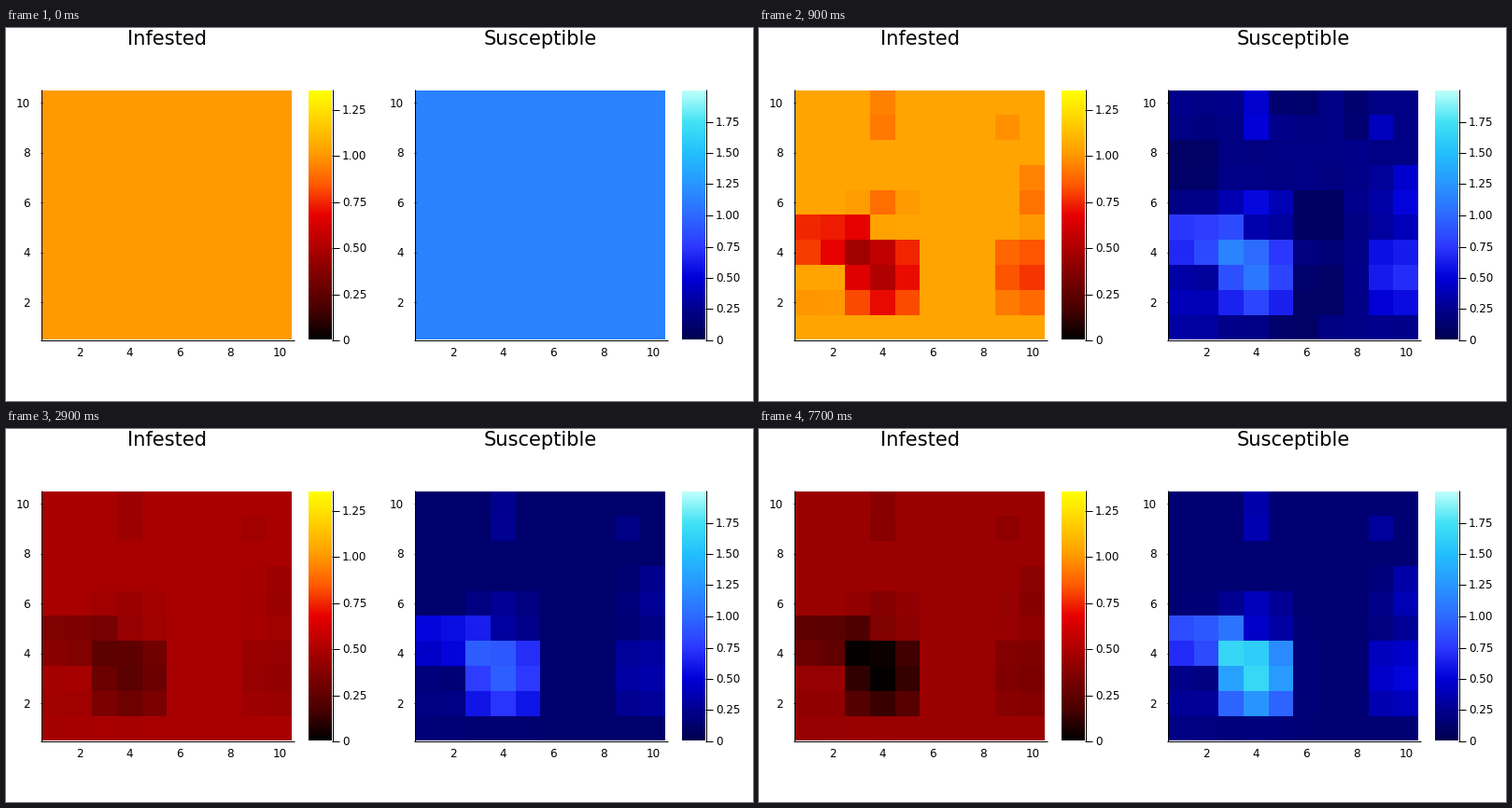
Recreate the animation shown at these times as a matplotlib script. Size 800 by 400 pixels, loop 8 s.

```python
import numpy as np
import matplotlib.pyplot as plt
from matplotlib.animation import FuncAnimation

W, H, DPI = 800, 400, 100
STEP, LOOP = 100, 8000
TOP, BOTTOM = 67, 334
I_MAX, S_MAX = 1.356, 2.0

X, Y = np.meshgrid(np.arange(1, 11), np.arange(10, 0, -1))


def plateau(x, y, rx, ry, height):
    """Flat-topped bump on the 10 x 10 grid."""
    return height * np.exp(-((X - x) / rx) ** 4 - ((Y - y) / ry) ** 4)


# Regions that start out more or less resistant: x, y, radii, height
REGIONS = [
    (4, 9.6, .7, 1, .33), (5.5, 10, .8, .7, -.22), (8, 9.3, .9, .9, -.18),
    (9, 9, .6, .6, .3), (1.5, 7.7, 1.2, 1.1, -.28), (4, 6, 1.2, .6, .35),
    (10, 6.2, 1, 1.4, .34), (2, 4.5, 1.6, .9, .52), (6.5, 5.4, .9, 1.3, -.3),
    (4, 3.1, 1.4, 1.5, .56), (9.7, 3, 1.2, 1.5, .47), (1.2, 2, 1.1, 1.3, .25),
    (6.5, 2.3, 1, 1, -.28), (5.5, 1, .8, .6, -.27),
]
noise = np.random.default_rng(4).uniform(-.04, .04, X.shape)
early = np.clip(.53 + noise + sum(plateau(*r) for r in REGIONS), .2, 1.15)
late = (.14 + .9 * np.clip(early - .6, 0, None)
        + plateau(4, 3.2, 1.4, 1.6, 1.1) + plateau(2, 4.7, 1.7, .85, .45))

# Time; susceptible = scale * early^p * late^q;
# infested = min(cap, start - slope * susceptible)
KEYS = [
    (0, 1.135, 0, 0, 1.01, 1.01, 0),
    (500, 1, 1, 0, 1.3, 1.45, .75),
    (900, .82, 1.35, .27, 1.04, 1.28, .72),
    (1300, .65, .95, .5, .84, 1.05, .62),
    (2900, .6, 0, .85, .48, .52, .31),
    (5200, .78, 0, .9, .46, .5, .33),
    (7700, 1, 0, 1, .44, .48, .28),
]


def densities(key):
    _, scale, p, q, cap, start, slope = key
    s = scale * early ** p * late ** q
    return np.clip(start - slope * s, 0, cap), s


def state(t):
    times = [key[0] for key in KEYS]
    t = min(t, times[-1])
    k = min(np.searchsorted(times, t, side="right"), len(KEYS) - 1) - 1
    w = (t - times[k]) / (times[k + 1] - times[k])
    if times[k] == 1300:  # decay towards the steady level
        w = (1 - np.exp(-2.3 * w)) / (1 - np.exp(-2.3))
    return [a + (b - a) * w
            for a, b in zip(densities(KEYS[k]), densities(KEYS[k + 1]))]


# Evenly spaced stops with evenly rising lightness
HEAT = [(0, 0, 0), (74, 0, 0), (123, 0, 0), (177, 0, 0), (230, 0, 0),
        (255, 91, 0), (255, 157, 0), (255, 207, 0), (255, 255, 0)]
COOL = [(0, 0, 78), (0, 0, 145), (0, 0, 217), (45, 57, 255), (45, 106, 255),
        (40, 150, 255), (34, 191, 252), (65, 226, 245), (190, 255, 250)]


def colorize(value, top_value, stops):
    at = np.linspace(0, top_value, len(stops))
    return np.stack([np.interp(value, at, c) for c in np.array(stops).T / 255], -1)


fig = plt.figure(figsize=(W / DPI, H / DPI), dpi=DPI, facecolor="white")
ax = fig.add_axes([0, 0, 1, 1])
ax.axis("off")


def text(x, y, label, size=12, ha="center"):
    # y is the middle of the digits or capitals
    ax.text(x, y + .365 * size, label, fontsize=size * 72 / DPI, ha=ha,
            va="baseline", family="DejaVu Sans", color="black")


def line(x0, y0, x1, y1):
    ax.plot([x0, x1], [y0, y1], color="black", lw=.72, solid_capstyle="butt")


def mesh(colors, x0, x1):
    rows, columns = colors.shape[:2]
    x_edges = np.round(np.linspace(x0, x1, columns + 1))
    y_edges = np.round(np.linspace(TOP - .4, BOTTOM + .4, rows + 1))
    return ax.pcolormesh(x_edges, y_edges, colors, zorder=1)


def panel(left, title, top_value, stops, ticks):
    heat = mesh(np.zeros((10, 10, 3)), left + 38.8, left + 306)
    bar = np.linspace(top_value, 0, BOTTOM - TOP)[:, None]
    mesh(colorize(bar, top_value, stops), left + 324, left + 349)
    text(left + 172.6, 10.6, title, 21)
    line(left + 37.5, TOP - 1, left + 37.5, BOTTOM + 1)
    line(left + 37, BOTTOM + .5, left + 309, BOTTOM + .5)
    for n in range(2, 11, 2):
        offset = (n - .5) * 26.75
        text(left + 38.9 + offset, 348, n)
        y = BOTTOM + .5 - offset
        text(left + 26, y, n, ha="right")
        line(left + 37, y, left + 39, y)
    line(left + 349.5, TOP - 1, left + 349.5, BOTTOM + 1)
    for tick in ticks:
        y = round(BOTTOM - tick / top_value * 268) + .5
        line(left + 349, y, left + 357, y)
        text(left + 360, y, f"{tick:.2f}" if tick else "0", ha="left")
    return heat


heats = (panel(0, "Infested", I_MAX, HEAT, np.arange(0, 1.3, .25)),
         panel(400, "Susceptible", S_MAX, COOL, np.arange(0, 1.8, .25)))
ax.set_xlim(0, W)
ax.set_ylim(H, 0)


def update(frame):
    t = frame * STEP
    if t > 3000:  # the late, slow phase is refreshed less often
        t -= t % 200
    infested, susceptible = state(t)
    heats[0].set_array(colorize(infested, I_MAX, HEAT))
    heats[1].set_array(colorize(susceptible, S_MAX, COOL))
    return heats


anim = FuncAnimation(fig, update, frames=LOOP // STEP, interval=STEP,
                     repeat=True, repeat_delay=0, blit=False)
plt.show()
```
